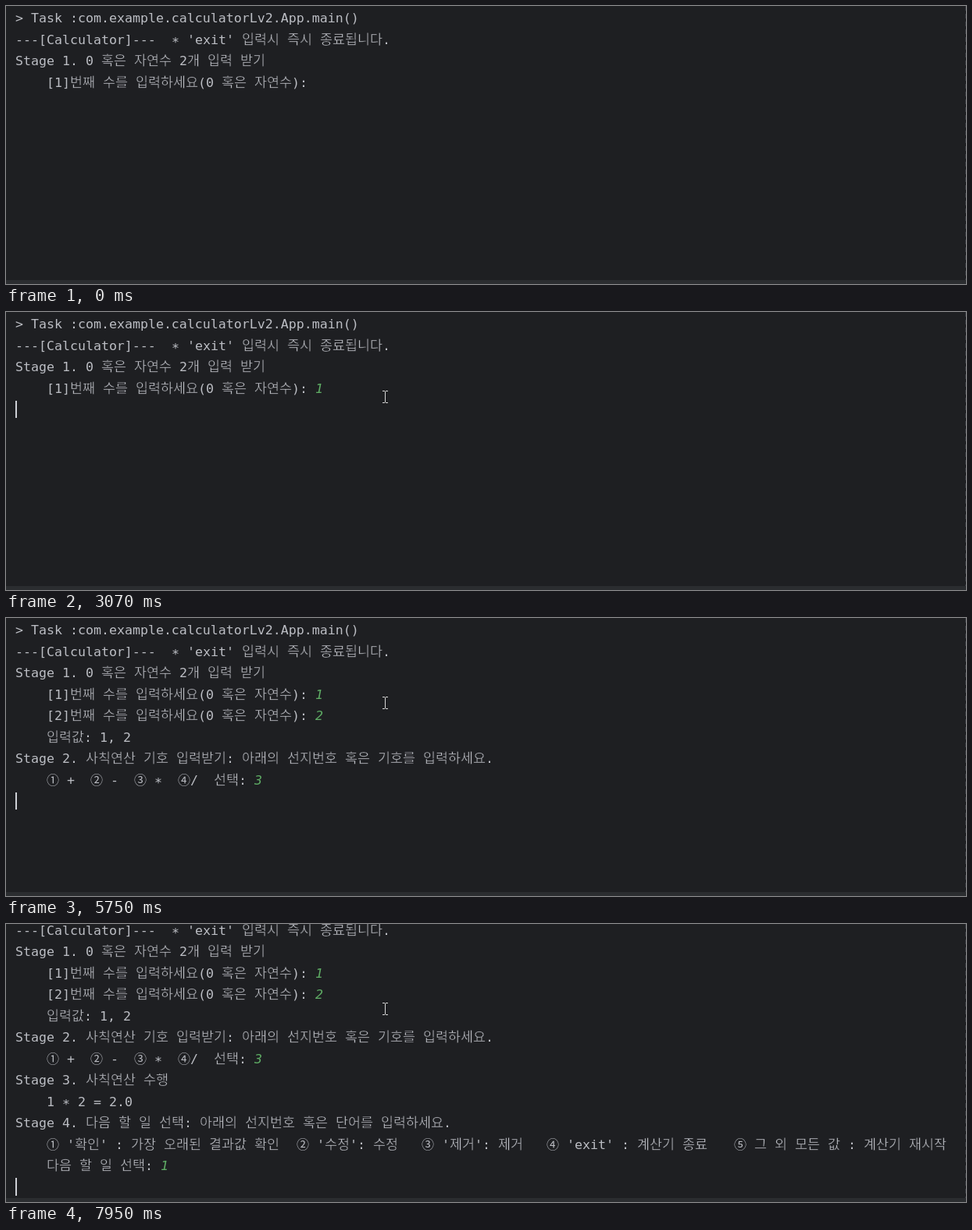
An HTML page for the animation above (8000 ms loop, 1229 by 357 pixels).

```html
<!DOCTYPE html>
<html lang="ko">
<head>
<meta charset="utf-8">
<title>Calculator console</title>
<style>
  html, body { margin: 0; width: 100%; height: 100%; overflow: hidden; background: #1e1f22; }
  svg { display: block; width: 1229px; height: 357px; }
  text { fill: #bcbec4; font: 16.6px "DejaVu Sans Mono", "Noto Sans Mono", monospace; font-variant-ligatures: none; }
  .hangul, .circled { font-family: "Noto Sans CJK KR", "Noto Sans CJK", "Noto Sans CJK JP", sans-serif; font-weight: 300; }
  /* The background-coloured outline thins the strokes. */
  .hangul { font-size: 17.4px; stroke: #1e1f22; stroke-width: .35px; }
  .circled { font-size: 16px; }
  .input { fill: #5fad65; font-style: italic; }
</style>
</head>
<body>
<svg viewBox="0 0 1229 357">
  <rect width="1229" height="357" fill="#1e1f22"/>
  <g id="console"></g>
  <rect id="caret" width="2" fill="#ced0d6"/>
  <path d="M1228.5 0V352" stroke="#393b40" stroke-dasharray="6 4"/>
  <rect y="352" width="1229" height="5" fill="#2b2d30"/>
  <path id="mouse" d="M-3.5 -7.5h3m1 0h3M-3.5 7.5h3m1 0h3M0 -7V7" fill="none" stroke="#d8d8d8"/>
</svg>
<script>
const LOOP = 8000, BLINK = 550;
const LEFT = 12, CELL = 10, WIDE = 16, TAB = 40;
const TOP = 3.5, PITCH = 27.5, CARET = 23, BASELINE = 18, BOTTOM = 349;

const $ = id => document.getElementById(id);
const set = (el, attrs) => {
  for (const key in attrs) el.setAttribute(key, attrs[key]);
  return el;
};
const add = (parent, tag, attrs, text = "") => {
  const el = set(document.createElementNS("http://www.w3.org/2000/svg", tag), attrs);
  el.textContent = text;
  return parent.appendChild(el);
};
const show = (el, on) => set(el, { visibility: on ? "visible" : "hidden" });

// The session: every action adds its text and records where the caret ends up.
const shown = [], carets = [], rows = [];
let x = LEFT, row = 0;

const rowGroup = () => rows[row] ??= add($("console"), "g", {});
const put = (at, cls, text, dy = 0) =>
  shown.push({ at, el: add(rowGroup(), "text", { x, y: dy, class: cls }, text) });
const focus = at => carets.push({ at, x, row });

function newline() {
  x = LEFT;
  row++;
}

function write(at, line) {
  for (const run of line.match(/\t| +|[가-힣]+|[①-⑤]|\*|[!-)+-~]+/g)) {
    if (run === "\t") {
      x = LEFT + TAB * (Math.floor((x - LEFT) / TAB) + 1);
      continue;
    }
    const cls = /[가-힣]/.test(run) ? "hangul" : /[①-⑤]/.test(run) ? "circled" : "mono";
    if (run[0] !== " ") put(at, cls, run, run === "*" ? 3 : 0);
    x += run.length * (cls === "mono" ? CELL : WIDE);
  }
}

function print(at, ...lines) {
  lines.forEach((line, i) => {
    if (i) newline();
    write(at, line);
  });
  if (at) focus(at);
}

function type(at, key) {
  put(at, "input", key);
  x += CELL;
  focus(at);
}

function enter(at) {
  newline();
  focus(at);
}

print(0,
  "> Task :com.example.calculatorLv2.App.main()",
  "---[Calculator]---  * 'exit' 입력시 즉시 종료됩니다.",
  "Stage 1. 0 혹은 자연수 2개 입력 받기",
  "\t[1]번째 수를 입력하세요(0 혹은 자연수): ");
focus(1710);
type(2650, "1");
enter(3070);
print(3330, "\t[2]번째 수를 입력하세요(0 혹은 자연수): ");
type(4220, "2");
enter(4490);
print(4760,
  "\t입력값: 1, 2",
  "Stage 2. 사칙연산 기호 입력받기: 아래의 선지번호 혹은 기호를 입력하세요.",
  "\t① +  ② -  ③ *  ④/  선택: ");
type(5220, "3");
enter(5750);
print(6030,
  "Stage 3. 사칙연산 수행",
  "\t1 * 2 = 2.0",
  "Stage 4. 다음 할 일 선택: 아래의 선지번호 혹은 단어를 입력하세요.",
  "\t① '확인' : 가장 오래된 결과값 확인\t② '수정': 수정\t③ '제거': 제거\t④ 'exit' : 계산기 종료\t⑤ 그 외 모든 값 : 계산기 재시작",
  "\t다음 할 일 선택: ");
focus(6320);
type(7550, "1");
enter(7950);

// The pointer enters from above the stage and glides in a few hard steps.
const glides = [
  { from: 70, to: 330, steps: 4, x: 602.5, y: 206 },
  { from: 810, to: 880, steps: 2, x: 487.5, y: 109 },
  { from: 1390, to: 1390, steps: 1, x: 485.5, y: 109 }
];

function pointer(t) {
  let pos = { x: 806, y: -57 };
  for (const { from, to, steps, x, y } of glides) {
    if (t < from) break;
    const gap = (to - from) / (steps - 1) || 1;
    const part = Math.min(steps, 1 + Math.floor((t - from) / gap + 1e-6)) / steps;
    pos = { x: pos.x + (x - pos.x) * part, y: pos.y + (y - pos.y) * part };
  }
  return pos;
}

function render(t) {
  const caret = carets.findLast(c => c.at <= t);
  const top = TOP + PITCH * (caret ? caret.row : 0);
  const scroll = Math.max(0, top + CARET - BOTTOM);

  rows.forEach((group, i) =>
    set(group, { transform: `translate(0 ${Math.floor(TOP + BASELINE + PITCH * i - scroll)})` }));
  shown.forEach(item => show(item.el, t >= item.at));

  show($("caret"), caret && Math.floor((t - caret.at) / BLINK) % 2 === 0);
  if (caret) {
    const y = Math.ceil(top - scroll);
    set($("caret"), {
      x: Math.max(LEFT, caret.x - 1),
      y,
      height: Math.floor(top - scroll + CARET) - y
    });
  }

  const pos = pointer(t);
  set($("mouse"), { transform: `translate(${pos.x} ${pos.y})` });
}

const start = performance.now();
function tick() {
  render((performance.now() - start) % LOOP);
  requestAnimationFrame(tick);
}
tick();
</script>
</body>
</html>
```
